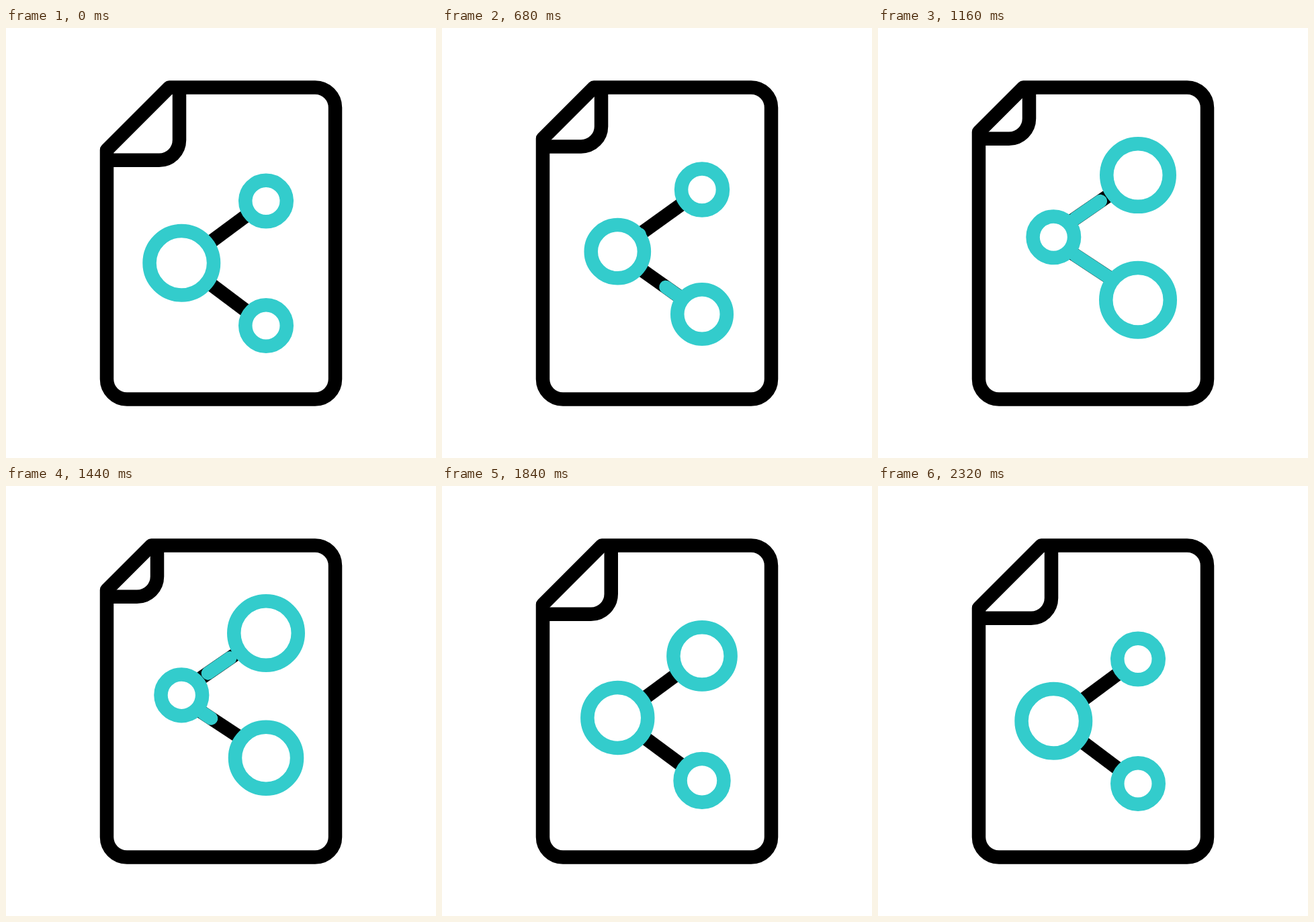
These frames come from a looping animation (640 by 640 pixels, 2480 ms). An HTML page:

```html
<!DOCTYPE html>
<html lang="en">
<head>
<meta charset="utf-8">
<title>Shared file</title>
<style>
  html, body { margin: 0; width: 100%; height: 100%; overflow: hidden; background: #fff; }
  svg { display: block; width: 100vw; height: 100vh; }
  svg * { stroke-width: 20.5; stroke-linejoin: round; }
  .ink { fill: none; stroke: #000; }
  .flow { fill: none; stroke: #3cc; stroke-width: 20; stroke-linecap: round; }
  .node { fill: #fff; stroke: #3cc; }
</style>
</head>
<body>
<svg viewBox="0 0 640 640">
  <path id="page" class="ink"/>
  <path id="fold" class="ink"/>
  <path id="upper" class="ink"/>
  <path id="lower" class="ink"/>
  <path id="upperFlow" class="flow"/>
  <path id="lowerFlow" class="flow"/>
  <circle id="left" class="node"/>
  <circle id="top" class="node"/>
  <circle id="bottom" class="node"/>
</svg>
<script>
  const LOOP = 2480, STEP = 40, START = 360;
  const LEFT_X = 261.3, RIGHT_X = 387;
  const get = id => document.getElementById(id);

  // start, end and power of the way out, then of the way back
  const tracks = {
    fold:   [[322, 962, 2.5], [1440, 2067, 3]],
    lift:   [[378, 1007, 3], [1423, 2030, 3]],
    left:   [[307, 1063, 3], [1364, 2091, 3]],
    bottom: [[322, 1126, 3], [1218, 2062, 2.5]],
    top:    [[569, 1353, 3], [1510, 2290, 3]],
    lowerFlow: [[322, 1126, 3], [1120, 1620, 3]],
    upperFlow: [[569, 1353, 3], [1240, 1800, 3]]
  };

  function ease(t, [from, to, power]) {
    const u = Math.min(1, Math.max(0, (t - from) / (to - from)));
    return u < 0.5 ? (2 * u) ** power / 2 : 1 - (2 - 2 * u) ** power / 2;
  }
  const mix = (a, b, p) => a + (b - a) * p;
  const swing = (t, name) => ease(t, tracks[name][0]) - ease(t, tracks[name][1]);

  function setPath(id, d) { get(id).setAttribute('d', d); }

  function drawPage(p) {
    const cut = 243 - 26.7 * p, x = 258 - 33 * p, y = 196.8 - 32.1 * p;
    setPath('page', `M${cut} 88.5H460A30 30 0 0 1 490 118.5V522.5A30 30 0 0 1 460 552.5` +
      `H180A30 30 0 0 1 150 522.5V${cut - 61.5}Z`);
    setPath('fold', `M${x} 88.5V${y - 30}A30 30 0 0 1 ${x - 30} ${y}H150`);
  }

  function drawNode(id, x, y, outer) {
    const node = get(id);
    node.setAttribute('cx', x);
    node.setAttribute('cy', y);
    node.setAttribute('r', outer - 10.25);
  }

  // A link runs from the left node (y0) to a right node (y1); its flow covers fromX..toX.
  function drawLink(id, y0, y1, t, fromX, toX) {
    const yAt = x => mix(y0, y1, (x - LEFT_X) / (RIGHT_X - LEFT_X));
    const line = (a, b) => `M${a} ${yAt(a)}L${b} ${yAt(b)}`;
    setPath(id, line(LEFT_X + 15, RIGHT_X - 15));
    const [grow, clear] = tracks[id + 'Flow'];
    const head = ease(t, grow), tail = ease(t, clear);
    const shown = t >= START && head - tail > 0.0005;
    setPath(id + 'Flow', shown ? line(mix(fromX, toX, tail), mix(fromX, toX, head)) : '');
  }

  function draw(t) {
    if (t < START) t = 0;
    const lift = swing(t, 'lift'), rise = 38.4 * lift;
    const leftY = 349.7 - rise, topY = 257.5 - rise, bottomY = 443.1 - rise;
    drawPage(swing(t, 'fold'));
    drawLink('upper', leftY + 1 - 6.5 * lift, topY, t, 293.4, 333.4);
    drawLink('lower', leftY - 1 + 6.5 * lift, bottomY - 5 * lift, t, 354.6, 294);
    drawNode('left', LEFT_X, leftY, mix(58, 41, swing(t, 'left')));
    drawNode('top', RIGHT_X, topY, mix(41, 58, swing(t, 'top')));
    drawNode('bottom', RIGHT_X, bottomY, mix(41, 58, swing(t, 'bottom')));
  }

  const begin = performance.now();
  function tick() {
    const t = (performance.now() - begin) % LOOP;
    draw(Math.floor(t / STEP) * STEP);
    requestAnimationFrame(tick);
  }
  tick();
</script>
</body>
</html>
```
